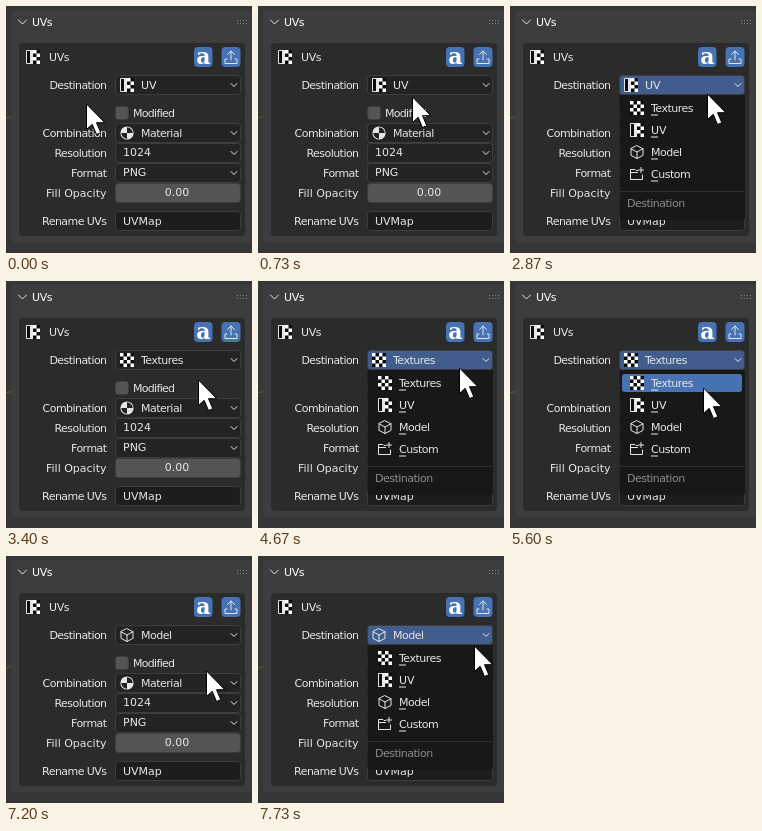
Animation of 246 by 247 pixels, one loop 8 s. Source, as an HTML page:

```html
<!DOCTYPE html>
<html lang="en">
<head>
<meta charset="utf-8">
<title>UVs panel</title>
<style>
html, body { margin: 0; width: 100%; height: 100%; overflow: hidden; background: #383838; }
svg { display: block; }
text { font: 11px "DejaVu Sans", sans-serif; fill: #e6e6e6; white-space: pre; }
.line { fill: none; stroke: #e6e6e6; stroke-linejoin: round; stroke-linecap: round; }
.letter { font: bold 22px "DejaVu Serif", serif; fill: #fff; }
</style>
</head>
<body>
<svg id="stage" width="246" height="247" viewBox="0 0 246 247"></svg>
<script>
const FPS = 15, FRAMES = 120;
const ITEMS = ['Textures', 'UV', 'Model', 'Custom'];

// Cursor path: frame, x, y, easing of the move that ends here
const smooth = u => u * u * (3 - 2 * u);
const speedUp = u => u * u;
const slowDown = u => 1 - (1 - u) ** 1.5;
const PATH = [
  [0, 80, 97], [4, 80, 97], [16, 198, 85, smooth],
  [42, 198, 85], [46, 192, 98, smooth],
  [65, 192, 98], [69, 201, 86, smooth],
  [79, 201, 86], [84, 193, 106, speedUp], [88, 178, 148, slowDown],
  [103, 178, 148], [112, 216, 89, smooth], [120, 216, 89]
];

const rect = (x, y, w, h, fill, r = 0, extra = '') =>
  `<rect x="${x}" y="${y}" width="${w}" height="${h}" rx="${r}" fill="${fill}" ${extra}/>`;
const text = (x, y, s, gap = -0.5, extra = '') =>
  `<text x="${x}" y="${y}" letter-spacing="${gap}" ${extra}>${s}</text>`;
const label = (y, s, gap = -.55) => text(100.5, y, s, gap, 'text-anchor="end"');
const line = (d, extra = '') => `<path class="line" d="${d}" ${extra}/>`;
const chevron = (x, y, r = 3) => line(`M${x - r} ${y - r / 2}l${r} ${r} ${r}-${r}`);
const field = (y, fill, r = 3) =>
  rect(109.5, y + .5, 125, 19, fill, r, 'stroke="#3d3d3d"');

function checks(x0, cols) {
  const size = 3.5;
  let d = '';
  for (let i = 0; i < cols; i++)
    for (let j = 0; j < 4; j++)
      if ((i + j) % 2 === 0) d += `M${x0 + i * size} ${j * size}h${size}v${size}h-${size}z`;
  return `<path fill="#fff" d="${d}"/>`;
}

const ICONS = {
  Textures: rect(0, 0, 14, 14, '#0c0c0c') + checks(0, 4),
  UV: rect(0, 0, 14, 14, '#0c0c0c') + line('M5 .5H.5V13.5H5') +
    rect(4, 0, 3, 14, '#e6e6e6') + checks(7, 2),
  Model: line('M7 .7L13 3.8V10.4L7 13.5 1 10.4V3.8zM1 3.8L7 7l6-3.2M7 7v6.5'),
  Custom: line('M7.5 3.5H6L5 2.5H.5V12.5H12.5V8M.5 5.5h7M11 .5v5M8.5 3h5'),
  Material: '<circle cx="7" cy="7" r="6.6" fill="#e6e6e6"/>' +
    '<path fill="#222" d="M7 7V1.3A5.7 5.7 0 0 1 12.7 7zM7 7v5.7A5.7 5.7 0 0 1 1.3 7z"/>'
};
const icon = (name, x, y) => `<g transform="translate(${x} ${y})">${ICONS[name]}</g>`;

const frame =
  rect(0, 0, 246, 247, '#363636') +
  '<path d="M0 112l5-1.5" stroke="#58632f"/>' +
  rect(5, 4, 245, 232, '#3d3d3d', 4) +
  chevron(16.5, 16, 4) + text(26, 20, 'UVs', -.4, 'style="fill:#fff"') +
  '<path d="M231 14.5h12M231 17.5h12" stroke="#888" stroke-dasharray="1 2"/>' +
  rect(13, 37, 226, 193, '#2b2b2b', 4) +
  icon('UV', 20, 44) + text(43, 55, 'UVs', -.4) +
  rect(188, 41, 18.5, 20, '#4772b3', 4) + rect(215.5, 41, 19, 20, '#4772b3', 4) +
  text(197.3, 57.5, 'a', 0, 'class="letter" text-anchor="middle"') +
  line('M225 54v-9M221.5 48.5l3.5-3.5 3.5 3.5M221 53h-2v4.5h12V53h-2') +
  label(83, 'Destination') + label(131, 'Combination') + label(151, 'Resolution') +
  label(171, 'Format') + label(191, 'Fill Opacity', 0) + label(219, 'Rename UVs');

function fields(hover) {
  const menu = y => field(y, hover > y && hover < y + 20 ? '#303030' : '#232323');
  return rect(109.5, 100.5, 13, 13, '#545454', 3) + text(127, 111, 'Modified', -.7) +
    menu(117) + icon('Material', 114, 120) + text(135, 131, 'Material') + chevron(228, 127) +
    menu(137) + text(117, 150, '1024', 0) + chevron(228, 147) +
    menu(157) + text(117, 170, 'PNG', 0) + chevron(228, 167) +
    field(177, '#545454') + text(171, 190, '0.00', 0, 'text-anchor="middle"') +
    field(205, '#1d1d1d') + text(117, 219, 'UVMap', 0);
}

const itemText = (x, y, name) => text(x, y, name, name === 'UV' ? 0 : -.5);

function destination(name, fill) {
  return field(69, fill) + icon(name, 114, 72) + itemText(135, 83, name) + chevron(228, 79);
}

function popup(active) {
  let out = rect(109.5, 89, 125.5, 125, '#181818', 3) + rect(109.5, 89, 125.5, 5, '#181818');
  ITEMS.forEach((name, i) => {
    const y = 102 + i * 22;
    if (i === active) out += rect(112, y - 9, 120, 18, '#4772b3', 3);
    out += icon(name, 120, y - 7) + itemText(141, y + 4, name) +
      rect(141, y + 6.5, 7, 1, '#e6e6e6');
  });
  return out + rect(110, 185, 125, 1, '#303030') +
    text(117, 201, 'Destination', -.5, 'style="fill:#8c8c8c"');
}

const tooltip = rect(169, 102, 90, 43, '#191919', 4) +
  text(181, 120, 'Select directory') +
  text(181, 132, 'Export UVs to', -.7, 'style="fill:#b0b0b0"');

const cursor = (x, y) => `<path transform="translate(${x} ${y})" fill="#fff" stroke="#000"
  d="M.5 1V26.5L6.2 21.3 10.5 31.5 14.8 29.7 10.5 19.7H18.8z"/>`;

function cursorAt(f) {
  const i = PATH.findIndex(p => p[0] > f);
  const [f0, x0, y0] = PATH[i - 1], [f1, x1, y1, ease = smooth] = PATH[i];
  const u = ease((f - f0) / (f1 - f0));
  return [Math.round(x0 + (x1 - x0) * u), Math.round(y0 + (y1 - y0) * u)];
}

const stage = document.getElementById('stage');
let shown = -1;

function draw(f) {
  const [x, y] = cursorAt(f);
  const within = (a, b) => f >= a && f < b;
  const open = within(29, 51) || within(70, 93) || f >= 116;
  const chosen = f < 51 ? 'UV' : f < 93 ? 'Textures' : 'Model';
  const hover = x >= 109 && !open ? y : -1;
  const fill = open || f >= 115 ? '#405d8e' : hover > 69 && hover < 90 ? '#303030' : '#232323';
  stage.innerHTML = frame + fields(hover) + destination(chosen, fill) +
    (open ? popup(y > 91 ? Math.floor((y - 91) / 22) : -1) : '') +
    (within(24, 29) ? tooltip : '') + cursor(x, y);
}

function tick() {
  const f = Math.floor(performance.now() * FPS / 1000 + .06) % FRAMES;
  if (f !== shown) draw(shown = f);
  requestAnimationFrame(tick);
}
tick();
</script>
</body>
</html>
```
